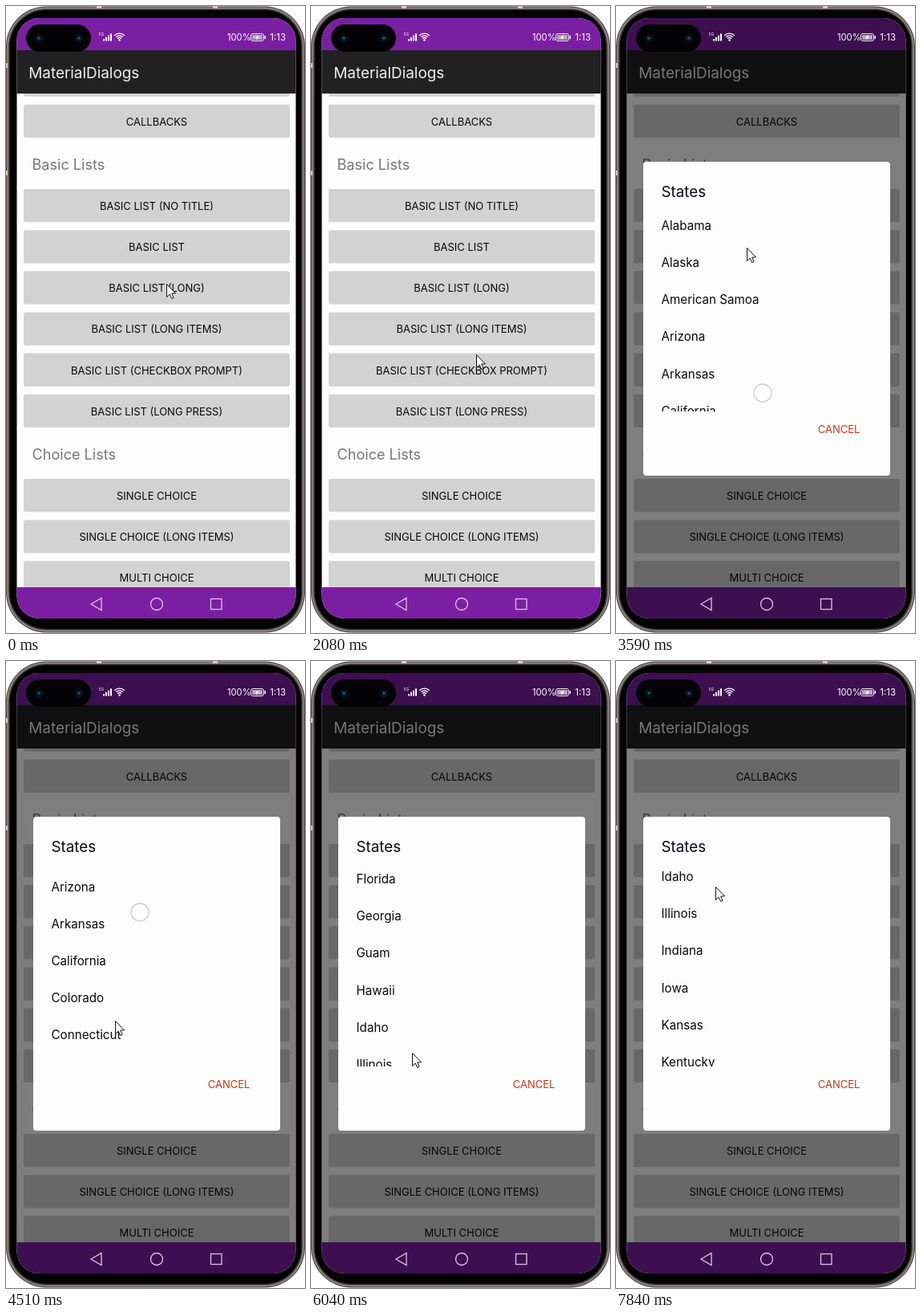
An HTML page with a canvas for the animation above (7.99 s loop, 373 px wide and 781 px high).

```html
<!DOCTYPE html>
<html lang="en">
<head>
<meta charset="utf-8">
<title>List dialog</title>
<style>
html, body { margin: 0; width: 100%; height: 100%; overflow: hidden; background: #fff; }
canvas { display: block; width: 373px; height: 781px; }
</style>
</head>
<body>
<canvas id="stage" width="373" height="781"></canvas>
<script>
const ctx = document.getElementById('stage').getContext('2d');
const LOOP = 7990;
const DIALOG_AT = 2230;
const SWIPE_AT = 3550, SWIPE_EVERY = 1080;
const FLING_TIME = 1070;
const BUTTON_PITCH = 51.15, ROW_PITCH = 46.2;
const FONT = 'Inter, "Open Sans", sans-serif';

const STATES = ['Alabama', 'Alaska', 'American Samoa', 'Arizona', 'Arkansas', 'California',
  'Colorado', 'Connecticut', 'Delaware', 'District of Columbia', 'Florida', 'Georgia', 'Guam',
  'Hawaii', 'Idaho', 'Illinois', 'Indiana', 'Iowa', 'Kansas', 'Kentucky', 'Louisiana'];

const SECTIONS = [
  { top: 71.5, buttons: ['', 'CALLBACKS'] },
  { title: 'Basic Lists', top: 228, buttons: ['BASIC LIST (NO TITLE)', 'BASIC LIST',
    'BASIC LIST (LONG)', 'BASIC LIST (LONG ITEMS)', 'BASIC LIST (CHECKBOX PROMPT)',
    'BASIC LIST (LONG PRESS)'] },
  { title: 'Choice Lists', top: 589, buttons: ['SINGLE CHOICE', 'SINGLE CHOICE (LONG ITEMS)',
    'MULTI CHOICE'] }
];

const FLINGS = [
  { start: 4050, distance: 329.4 },
  { start: 5500, distance: 264.2 },
  { start: 7400, distance: 157 }
];

const mix = (a, b, f) => a + (b - a) * f;

function progress(t, start, duration) {
  return Math.min(1, Math.max(0, (t - start) / duration));
}

function smooth(t, start, duration) {
  const f = progress(t, start, duration);
  return f * f * (3 - 2 * f);
}

function scrollAt(t) {
  return FLINGS.reduce((sum, f) => sum + f.distance * smooth(t, f.start, FLING_TIME), 0);
}

// The pointer rests on a button, moves to the list, then swipes upwards at a steady beat.
function pointerAt(t) {
  const leave = smooth(t, 1930, 150);
  const settle = smooth(t, 2080, 930);
  const beat = Math.max(0, Math.round((t - SWIPE_AT) / SWIPE_EVERY));
  const swipe = Math.exp(-(((t - SWIPE_AT - beat * SWIPE_EVERY) / 90) ** 2));
  const drift = 124 + 41 * Math.exp(-Math.max(0, t - SWIPE_AT) / 800);
  return [
    mix(mix(200, 206, leave), drift, settle),
    mix(mix(346, 434, leave), 488, settle) - 230 * swipe
  ];
}

function rect(x, y, w, h, fill) {
  ctx.fillStyle = fill;
  ctx.fillRect(x, y, w, h);
}

function box(x, y, w, h, r, fill) {
  ctx.beginPath();
  ctx.roundRect(x, y, w, h, r);
  ctx.fillStyle = fill;
  ctx.fill();
}

function disc(x, y, r, fill) {
  ctx.beginPath();
  ctx.arc(x, y, r, 0, Math.PI * 2);
  ctx.fillStyle = fill;
  ctx.fill();
}

function polygon(points) {
  ctx.beginPath();
  points.forEach(([x, y]) => ctx.lineTo(x, y));
  ctx.closePath();
}

function outline(color, width) {
  ctx.strokeStyle = color;
  ctx.lineWidth = width;
  ctx.stroke();
}

function label(text, x, y, size, color, align = 'left') {
  ctx.font = `${size}px ${FONT}`;
  ctx.textAlign = align;
  ctx.fillStyle = color;
  ctx.fillText(text, x, y);
}

function drawPhone() {
  rect(0, 0, 373, 781, '#fff');
  const layers = ['#4a4543', '#9a928d', '#6a6461', '#35312f', '#030303'];
  layers.forEach((color, i) => {
    const inset = i * 1.2;
    box(inset, 0.5 + inset, 373 - 2 * inset, 780 - 2 * inset, 50 - inset, color);
  });
  for (const x of [113, 258]) rect(x, 0, 6, 3, '#d8d0c8');
  for (const y of [71, 205]) rect(0, y, 2, 6, '#d8c6be');
}

function drawPage() {
  rect(13, 14, 349, 750, '#fdfdfd');
  for (const { title, top, buttons } of SECTIONS) {
    if (title) label(title, 32.5, top - 23.7, 18.1, '#777');
    buttons.forEach((text, i) => {
      const y = top + i * BUTTON_PITCH;
      box(22, y, 332, 41.3, 2, '#d2d2d2');
      label(text, 188, y + 26, 13, '#080808', 'center');
    });
  }
  rect(13, 14, 349, 41, '#7b1fa2');
  rect(13, 55, 349, 54, '#212121');
  label('MaterialDialogs', 28.3, 90, 18.9, '#f0f0f0');
  rect(13, 724, 349, 40, '#7b1fa2');
}

function drawStatus() {
  box(25, 23, 81, 34, 17, '#030306');
  for (const x of [41, 91]) {
    disc(x, 40, 5.5, '#06101a');
    disc(x, 40, 2, '#124a75');
  }

  label('5G', 115.5, 36.5, 5, '#fff');
  for (let i = 0; i < 4; i++) rect(121 + i * 3, 41 - i * 2.2, 2, 2.5 + i * 2.2, '#fff');
  for (let i = 0; i < 3; i++) {
    ctx.beginPath();
    ctx.arc(141.5, 43, 3.5 + i * 2.7, -Math.PI * 0.75, -Math.PI * 0.25);
    outline('#fff', 1.3);
  }
  disc(141.5, 42.5, 1.3, '#fff');

  label('100%', 276, 43.3, 11.2, '#fff');
  label('1:13', 349, 43.3, 11.5, '#fff', 'right');
  ctx.beginPath();
  ctx.roundRect(305.5, 34.5, 16, 9, 2.5);
  outline('#eee', 1);
  box(307, 36, 13, 6, 1, '#b9a6c2');
  rect(322.5, 37, 1.5, 4, '#eee');
  polygon([[314.5, 36], [311, 39.7], [313, 39.7], [312, 42.5], [316, 38.5], [314, 38.5]]);
  ctx.fillStyle = '#fff';
  ctx.fill();
}

function drawNav() {
  polygon([[106, 745], [119, 737.5], [119, 752.5]]);
  outline('#d9c3e2', 1.3);
  ctx.beginPath();
  ctx.arc(188, 745, 7.5, 0, Math.PI * 2);
  outline('#d9c3e2', 1.3);
  ctx.strokeRect(255.5, 738.5, 13.5, 13);
}

function drawDialog(scroll) {
  rect(13, 14, 349, 750, 'rgba(0,0,0,.5)');
  box(34, 194, 308, 391, 4, '#fdfdfd');
  label('States', 56.5, 237.8, 18.8, '#080820');

  ctx.save();
  ctx.beginPath();
  ctx.rect(34, 251, 308, 254);
  ctx.clip();
  STATES.forEach((name, i) => {
    label(name, 56.5, 278.8 + i * ROW_PITCH - scroll, 15.2, '#0a0a0a');
  });
  ctx.restore();
  label('CANCEL', 278, 531.7, 13, '#c93812', 'center');
}

function drawTouch(t) {
  const f = progress(t, 4050, 460);
  disc(mix(183, 167, f), mix(482, 313, f), 11, 'rgba(255,255,255,.75)');
  outline('#cbcbe0', 1.3);
}

function drawPointer(x, y) {
  ctx.save();
  ctx.translate(Math.round(x) + 0.5, Math.round(y) + 0.5);
  polygon([[0, 0], [0, 16], [3.7, 12.6], [6.2, 18], [8.6, 17], [6.2, 11.6], [11, 11.4]]);
  ctx.fillStyle = '#fff';
  ctx.fill();
  outline('#111', 1);
  ctx.restore();
}

function render(t) {
  drawPhone();
  ctx.save();
  ctx.beginPath();
  ctx.roundRect(13.5, 15, 348, 748, 28);
  ctx.clip();
  drawPage();
  if (t >= DIALOG_AT) drawDialog(scrollAt(t));
  drawStatus();
  drawNav();
  ctx.restore();
  if (t >= 3450 && t < 4630) drawTouch(t);
  drawPointer(...pointerAt(t));
}

function frame() {
  render(performance.now() % LOOP);
  requestAnimationFrame(frame);
}
frame();
</script>
</body>
</html>
```
